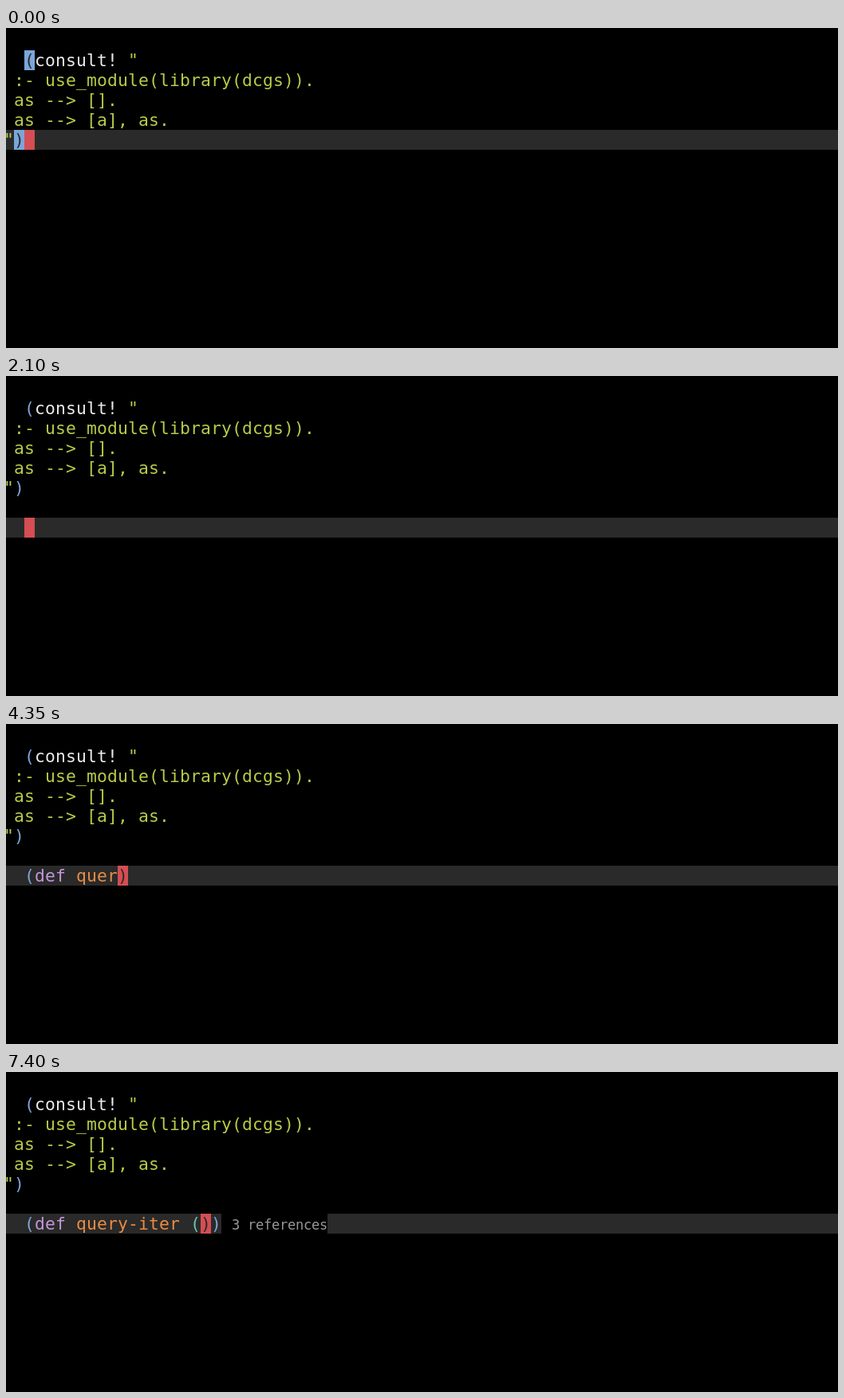
Animation of 1043 by 402 pixels, one loop 8 s. Source, as an HTML page with a canvas:

```html
<!DOCTYPE html>
<html lang="en">
<head>
<meta charset="utf-8">
<title>Editor session</title>
<style>
  html, body { margin: 0; width: 100%; height: 100%; overflow: hidden; background: #000; }
  canvas { display: block; }
</style>
</head>
<body>
<canvas id="stage" width="1043" height="402"></canvas>
<script>
const ctx = document.getElementById('stage').getContext('2d');
const LOOP = 8000, CELL = 13, LINE = 25, ASCENT = 20;
const FAMILY = '"DejaVu Sans Mono", monospace';
const C = {
  back: '#000000', line: '#2a2a2a', text: '#eaeaea', red: '#d54e53', orange: '#e78c45',
  green: '#b9ca4a', aqua: '#70c0b1', blue: '#7aa6da', purple: '#c397d8',
  grey: '#969896', result: '#1a1a1a'
};

// Moments at which the form being typed grows
const typing = [
  [3200, ''], [3650, 'd'], [3800, 'def'], [3900, 'def '],
  [4100, 'def q'], [4200, 'def qu'], [4250, 'def que'], [4350, 'def quer'],
  [4550, 'def query'], [4750, 'def query-'], [4950, 'def query-i'],
  [5050, 'def query-it'], [5200, 'def query-ite'], [5300, 'def query-iter'],
  [5850, 'def query-iter '], [6300, 'def query-iter (']
];

const colX = col => col * CELL - 3;
const rowY = row => row * LINE + 3;

function rect(x, y, w, h, color) {
  ctx.fillStyle = color;
  ctx.fillRect(x, y, w, h);
}

function write(str, x, row, color, size = 21.333, step = CELL) {
  ctx.font = `${size}px ${FAMILY}`;
  ctx.fillStyle = color;
  [...str].forEach((ch, i) => ctx.fillText(ch, x + i * step, rowY(row) + ASCENT));
}

const put = (str, col, row, color) => write(str, colX(col), row, color);

function block(ch, col, row, color) {
  rect(colX(col), rowY(row), CELL, LINE, color);
  put(ch, col, row, C.line);
}

function paren(ch, col, row, matched) {
  if (matched) block(ch, col, row, C.blue);
  else put(ch, col, row, C.blue);
}

function drawProgram(matched) {
  paren('(', 2, 1, matched);
  put('consult!', 3, 1, C.text);
  put('"', 12, 1, C.green);
  put(':- use_module(library(dcgs)).', 1, 2, C.green);
  put('as --> [].', 1, 3, C.green);
  put('as --> [a], as.', 1, 4, C.green);
  put('"', 0, 5, C.green);
  paren(')', 1, 5, matched);
}

function drawResult() {
  const x = colX(2), y = rowY(5), w = 8 * CELL + 2;
  rect(x, y, w, LINE, C.back);
  rect(x + 1, y + 1, w - 2, LINE - 2, C.result);
  rect(x + 1, y, CELL, LINE, C.red);
  write('=>', x + 1 + CELL, 5, C.text);
  write(':ok', x + 1 + 4 * CELL, 5, C.aqua);
}

function drawForm(str, lens) {
  const row = 7, end = 3 + str.length;
  const nested = str.endsWith('(');
  put('(', 2, row, C.blue);
  put(str.slice(0, 3), 3, row, str.startsWith('def') ? C.purple : C.text);
  put(str.slice(4, 14), 7, row, C.orange);
  if (nested) {
    put('(', end - 1, row, C.aqua);
    put(')', end + 1, row, C.blue);
  }
  block(')', end, row, C.red);
  if (lens) {
    const x = colX(end + 2);
    rect(x, rowY(row), 133, LINE, C.back);
    write('3 references', x + CELL, row, C.grey, 17.067, 10);
  }
}

function draw(t) {
  const row = t < 1950 ? 5 : t < 2100 ? 6 : 7;
  rect(0, 0, 1043, 402, C.back);
  rect(0, rowY(row), 1043, LINE, C.line);
  drawProgram(t < 2100);
  const typed = typing.filter(([at]) => at <= t).pop();
  if (typed) drawForm(typed[1], t >= 7400);
  else if (t >= 800 && t < 1950) drawResult();
  else block(' ', 2, row, C.red);
}

const start = performance.now();
function tick() {
  draw((performance.now() - start) % LOOP);
  requestAnimationFrame(tick);
}
tick();
</script>
</body>
</html>
```
